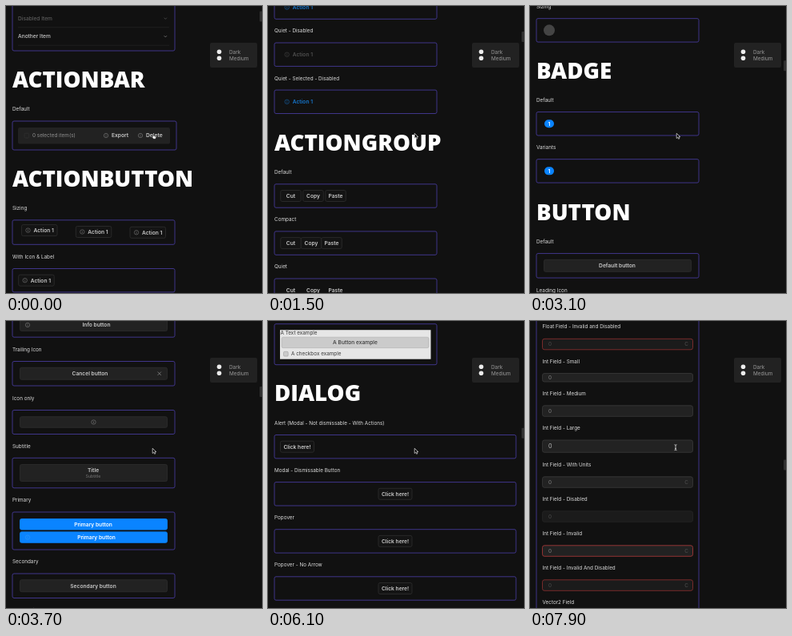
An HTML page that plays this animation: 320x359 px, repeating every 8 s.

```html
<!DOCTYPE html>
<html lang="en">
<head>
<meta charset="utf-8">
<title>Component gallery</title>
<style>
  html, body { margin: 0; width: 100%; height: 100%; overflow: hidden; background: #111; }
  svg { display: block; width: 100vw; height: 100vh; font-family: Inter, "Open Sans", sans-serif; }
  .head { font: 800 27.7px "Open Sans", "Noto Sans", sans-serif; fill: #fff; }
  .cursor { visibility: hidden; }
  .cursor.on { visibility: visible; }
</style>
</head>
<body>
<svg viewBox="0 0 320 359">
  <g id="page"></g>
  <rect x="255" y="46" width="59" height="31" rx="2" fill="#222"/>
  <g fill="#ececec"><circle cx="266.5" cy="57.2" r="2.8"/><circle cx="266.5" cy="65.2" r="2.8"/></g>
  <g fill="#999" font-size="6.4"><text x="279" y="59.6">Dark</text><text x="279" y="67.6">Medium</text></g>
  <rect id="thumb" x="317" width="4" height="13" rx="1" fill="#303030"/>
  <path id="arrow" class="cursor" d="M183.2 159.3v6.2l1.5-1.3 1 2.1 1.1-.5-1-2.1h2z" fill="#000" stroke="#ddd" stroke-width=".75"/>
  <path id="hand" class="cursor" d="M183.4 160.3q.6-.9 1.2 0v2.2l2.3.6q.8.3.6 1.1l-.5 2.1h-2.7l-1.7-2.4q0-.9.8-.5z" fill="#fff" stroke="#111" stroke-width=".5"/>
  <path id="beam" class="cursor" d="M180.5 154.7q1.5 0 1.5 1v5q0 1-1.5 1M183.5 154.7q-1.5 0-1.5 1M183.5 161.7q-1.5 0-1.5-1M181 159.6h2" fill="none" stroke="#ddd" stroke-width=".8"/>
</svg>
<script>
const PURPLE = '#473b9f', BLUE = '#0a84ff', LINK = '#1577cf', RED = '#a83838';
const INK = '#c9c9c9', MUTED = '#8f8f8f', DIM = '#505050', EDGE = '#2e2e2e';
const ROW = 59.1;
const parts = [], hits = [];
let base = 0;

// ---- primitives ----
function rect(x0, x1, y0, y1, stroke, fill = 'none', r = 2) {
  parts.push(`<rect x="${x0}" y="${base + y0}" width="${x1 - x0}" height="${y1 - y0}" rx="${r}" fill="${fill}" stroke="${stroke}" stroke-width=".85"/>`);
}
function text(x, y, s, { size = 6.35, fill = INK, weight = 400, anchor = 'start' } = {}) {
  const safe = s.replace(/&/g, '&amp;');
  parts.push(`<text x="${x}" y="${base + y + size * .36}" font-size="${size}" font-weight="${weight}" fill="${fill}" text-anchor="${anchor}">${safe}</text>`);
}
function line(x, y, d, color, width = .8) {
  parts.push(`<path transform="translate(${x} ${base + y})" d="${d}" fill="none" stroke="${color}" stroke-width="${width}"/>`);
}
const info = (x, y, color = MUTED) =>
  line(x, y, 'M-2.7 0a2.7 2.7 0 1 0 5.4 0a2.7 2.7 0 1 0-5.4 0M0-.4v1.9M0-1.6v.7', color, .5);
const hit = (kind, y0, y1) => hits.push([kind, base + y0, base + y1]);

// ---- components ----
function head(y, s) {
  parts.push(`<text class="head" x="8" y="${base + y - .8}">${s}</text>`);
}
const label = (y, s, x = 8) => text(x, y + .2, s, { fill: '#dcdcdc' });
const panel = (y0, y1, right = 211) => rect(8, right, y0, y1, PURPLE, 'none', 2);
const bold = (x, y, s, fill = INK) => text(x, y, s, { size: 6.65, weight: 600, fill, anchor: 'middle' });

function row(y, s, draw, height = 29.4, right = 211) {
  label(y, s);
  panel(y + 15, y + 15 + height, right);
  draw(y + 15 + height / 2);
}
function rows(y, pitch, names, draw, height) {
  names.forEach((s, i) => row(y + i * pitch, s, c => draw(c, s, i), height));
}
function action(x, c, color = INK, quiet = false) {
  if (!quiet) rect(x, x + 44.5, c - 7, c + 7, EDGE, '#141414');
  info(x + 8, c, color === INK ? MUTED : color);
  text(x + 15, c, 'Action 1', { size: 6.65, weight: 600, fill: color });
}
function chip(cx, c, s, w = 25.5, quiet = false) {
  if (!quiet) rect(cx - w / 2, cx + w / 2, c - 7, c + 7, EDGE, '#141414');
  bold(cx, c, s);
}
function iconChip(x, c) {
  rect(x, x + 14, c - 7, c + 7, EDGE, '#141414');
  info(x + 7, c);
}
function wide(c, s, { fill = '#222', edge = '#2d2d2d', ink = INK, h = 15, cx = 109, dy = 0 } = {}) {
  rect(17.5, 201.5, c - h / 2, c + h / 2, edge, fill);
  bold(cx, c + dy, s, ink);
  hit('hand', c - h / 2, c + h / 2);
}
function box(c, mark, edge = '#404040', fill = '#222', ink = '#999') {
  rect(19.5, 25.2, c - 2.9, c + 2.9, edge, fill, 1.3);
  if (mark === 'check') line(22.3, c, 'M-1.7 0l1.2 1.3 2.2-2.7', ink);
  if (mark === 'dash') line(22.3, c, 'M-1.6 0h3.2', ink);
}
function check(c, s, mark, color = MUTED, edge, fill, ink) {
  box(c, mark, edge, fill, ink);
  text(29, c, s, { fill: color });
}
function field(y, s, { h = 13.5, off = 0, edge = '#383838', unit = '', ink = '#808080', size = 6.35, value = '0', fill = '#222' } = {}) {
  label(y, s, 15.5);
  const top = y + 15.3 + off;
  rect(15.5, 203.5, top, top + h, edge, fill, 2.5);
  text(23, top + h / 2, value, { fill: ink, size });
  if (unit) text(195.5, top + h / 2, unit, { fill: DIM, anchor: 'middle' });
  hit('beam', top, top + h);
}
function themed(y, s, [bg, btn, ink]) {
  label(y, s);
  panel(y + 15, y + 66);
  rect(15, 203.5, y + 22.5, y + 59, 'none', bg, 0);
  text(15.5, y + 26.5, 'A Text example', { fill: ink });
  rect(17, 201, y + 31.5, y + 45, '#8885', btn);
  text(109, y + 38, 'A Button example', { size: 6.65, weight: 500, fill: ink, anchor: 'middle' });
  hit('hand', y + 31.5, y + 45);
  box(y + 52.5, '', '#8888', btn);
  text(29, y + 52.5, 'A checkbox example', { fill: ink });
}

// ---- scroll offsets of the main stops ----
const STOPS = [[0, 0], [800, 270.5], [2300, 1182.7], [3700, 2070.7], [4900, 2794.6], [6100, 3485], [7900, 4577]];
const offset = i => STOPS[i][1];

// ---- accordion end, action bar, action button ----
panel(-60, 56);
[['Disabled Item', 15.5, '#5c5c5c'], ['Another Item', 38, INK]].forEach(([s, y, c]) => {
  text(15, y, s, { size: 6.6, weight: 500, fill: c });
  line(199.3, y, 'M-1.7-.8l1.7 1.7 1.7-1.7', c === INK ? MUTED : c, .7);
  line(15, y + 11.2, 'M0 0h189', '#252525', .7);
});
head(103, 'ACTIONBAR');
label(129, 'Default');
panel(144, 180, 213);
rect(15, 205, 152, 172.5, 'none', '#222');
rect(23, 28.7, 159.2, 165, '#303030', 'none', 1.3);
text(33, 162, '0 selected item(s)', { fill: MUTED });
[[125, 'Export'], [168, 'Delete']].forEach(([x, s]) => {
  info(x, 162);
  text(x + 7, 162, s, { size: 6.65, weight: 600 });
});
hit('hand', 153, 171);
head(227, 'ACTIONBUTTON');
label(253, 'Sizing');
panel(267.8, 298.3);
action(19.5, 280.6); action(87.3, 282.5); action(155, 283.3);
rows(313.5, ROW, ['With Icon & Label', 'With Icon Only', 'Selected', 'Disabled', 'Selected - Disabled',
  'Quiet', 'Quiet - Selected', 'Quiet - Disabled', 'Quiet - Selected - Disabled'], (c, s, i) => {
  if (i === 1) return iconChip(16, c);
  action(15.7, c, /Selected/.test(s) ? LINK : /Disabled/.test(s) ? DIM : INK, /Quiet/.test(s));
});

// ---- action group ----
const EDITS = ['Cut', 'Copy', 'Paste'];
head(877.6, 'ACTIONGROUP');
rows(904, ROW, ['Default', 'Compact', 'Quiet', 'Justified', 'Justified (Icon only)'], (c, s, i) =>
  EDITS.forEach((e, k) => i === 4 ? iconChip(16 + k * 16.3, c) : chip(28.5 + k * (i === 1 ? 25.5 : 28), c, e, 25.5, i === 2)));
base = offset(2);
rows(16.5, 93.5, ['Vertical', 'Vertical - Quiet', 'Vertical - Justified', 'Vertical - Justified (Icon only)'], (c, s, i) =>
  EDITS.forEach((e, k) => {
    const y = c + (k - 1) * 16.3 - .7;
    i === 3 ? iconChip(15.7, y) : chip(28.5, y, e, 25.5, i === 1);
  }), 63.3);

// ---- avatar, badge ----
head(422, 'AVATAR');
rows(449, ROW, ['Default', 'Sizing'], c => parts.push(`<circle cx="24" cy="${base + c}" r="7" fill="#444"/>`));
head(599, 'BADGE');
rows(625, ROW, ['Default', 'Variants'], c => {
  rect(18, 30, c - 5, c + 5, 'none', BLUE, 5);
  bold(24, c, '1', '#fff');
});

// ---- button ----
base = offset(3);
head(-112, 'BUTTON');
row(-86, 'Default', c => wide(c, 'Default button'), 30.5);
row(-25.3, 'Leading Icon', c => { wide(c, 'Info button', { cx: 113 }); info(27, c); }, 30.5);
row(35.5, 'Trailing Icon', c => {
  wide(c, 'Cancel button', { cx: 105 });
  line(191.7, c, 'M-2.2-2.2l4.4 4.4M2.2-2.2l-4.4 4.4', MUTED, .7);
}, 30.5);
row(96.5, 'Icon only', c => { wide(c, '', { h: 13.5 }); info(109.5, c); }, 30);
row(156.3, 'Subtitle', c => {
  wide(c, 'Title', { h: 21, dy: -3.2 });
  text(109, c + 4.3, 'Subtitle', { size: 5.3, fill: '#777', anchor: 'middle' });
}, 37.5);
row(224, 'Primary', c => {
  const blue = { fill: BLUE, edge: BLUE, ink: '#fff', h: 13.5 };
  wide(c - 8.2, 'Primary button', blue);
  wide(c + 8.1, 'Primary button', { ...blue, cx: 113 });
  info(27, c + 8.1, '#3b9cf5');
}, 47);
row(301, 'Secondary', c => wide(c, 'Secondary button'), 30.5);
row(362, 'Destructive', c => wide(c, 'Destructive button', { fill: RED, edge: RED, ink: '#fff' }), 30.5);

// ---- checkbox ----
head(455, 'CHECKBOX');
base = offset(4);
const CHECKS = [
  ['Unchecked', 'Unchecked'], ['Checked', 'Checked', 'check'], ['Intermediate', 'Intermediate', 'dash'],
  ['Checked - Disabled', 'Checked Disabled', 'check', DIM, '#333'],
  ['Intermediate - Disabled', 'Intermediate Disabled', 'dash', DIM, '#333', '#222', '#666'],
  ['Intermediate - Invalid', 'Intermediate Invalid', 'dash', RED, RED, '#251717', '#ccc'],
  ['Intermediate - Disabled - Invalid', 'Intermediate Disabled Invalid', 'dash', '#983434', '#903232', '#642626', '#984444'],
  ['Emphasized - Unchecked', 'Unchecked', '', MUTED, '#3a3a3a'],
  ['Emphasized - Checked', 'Checked', 'check', MUTED, LINK, '#1268b8', '#fff'],
  ['Emphasized - Intermediate', 'Intermediate', 'dash', MUTED, LINK, '#1268b8', '#fff'],
  ['Emphasized - Intermediate - Disabled', 'Intermediate Disabled', 'dash', DIM, '#333', '#222', '#666'],
  ['Emphasized - Invalid', 'Unchecked Invalid', '', RED, RED]
];
CHECKS.forEach(([name, ...look], i) => row(-9.3 + (i - 4) * 58.35, name, c => check(c, ...look), 28.4));

// ---- context, dialog ----
head(491, 'CONTEXT');
const DARK = ['#222', '#303030', '#ccc'], LIGHT = ['#e6e6e6', '#cbcbcb', '#383838'];
themed(517, 'Default', DARK);
base = offset(5);
themed(-92.5, 'Dark', DARK);
themed(-11.3, 'Light', LIGHT);
head(101, 'DIALOG');
['Alert (Modal - Not dismissable - With Actions)', 'Modal - Dismissable Button', 'Popover', 'Popover - No Arrow']
  .forEach((s, i) => row(127.5 + i * ROW, s, c => chip(i ? 159 : 36.5, c, 'Click here!', 42), 29.4, 310));
head(396, 'DIVIDER');
rows(422, ROW, ['Horizontal', 'Vertical'], (c, s, i) => line(109, c, i ? 'M0-8v16' : 'M-92 0h184', '#444'));

// ---- fields ----
head(572, 'FIELDS');
label(598, 'Default');
panel(613, 1700);
base = offset(6);
const OFF = { ink: '#4c4c4c', fill: '#1b1b1b', edge: '#252525' };
const BAD = { edge: RED, unit: 'C' };
const BAD_OFF = { ...OFF, edge: '#8a2f2f', unit: 'C' };
['', ' - Placeholder', ' - Disabled', ' - Invalid', ' - Invalid and Disabled'].forEach((s, i) =>
  field(-466 + i * 43, 'Text Field' + s, { ...[{}, {}, OFF, { edge: RED }, { ...OFF, edge: '#8a2f2f' }][i], value: 'Text' }));
function numbers(y, name, and) {
  [
    [0, 'Small', { h: 10.5, off: -.3 }],
    [40, 'Medium', {}],
    [83.2, 'Large', { h: 15.3, size: 7.2, ink: '#bbb' }],
    [129, 'With Units', { unit: 'C' }],
    [172, 'Disabled', OFF],
    [215, 'Invalid', BAD],
    [258, `Invalid ${and} Disabled`, BAD_OFF]
  ].forEach(([dy, s, look]) => field(y + dy, `${name} Field - ${s}`, look));
}
numbers(-251, 'Float', 'and');
numbers(50.5, 'Int', 'And');
label(351.5, 'Vector2 Field', 15.5);

// ---- motion ----
const $ = id => document.getElementById(id);
$('page').innerHTML = parts.join('');

function scrollAt(t) {
  let i = 1;
  while (i < STOPS.length - 1 && t > STOPS[i][0]) i++;
  const [t0, s0] = STOPS[i - 1], [t1, s1] = STOPS[i];
  const p = (t - t0) / (t1 - t0);
  return s0 + (s1 - s0) * (i === 1 ? p ** 1.8 : p);
}
const start = performance.now();
function draw() {
  const t = Math.floor((performance.now() - start) % 8000 / 100) * 100;
  const s = scrollAt(t), y = s + 160;
  $('page').setAttribute('transform', `translate(0 ${-s})`);
  $('thumb').setAttribute('y', 6.5 + s / 27.4);
  const over = hits.find(([, y0, y1]) => y > y0 && y < y1);
  const kind = over ? over[0] : 'arrow';
  for (const id of ['arrow', 'hand', 'beam']) $(id).classList.toggle('on', id === kind);
  requestAnimationFrame(draw);
}
draw();
</script>
</body>
</html>
```
